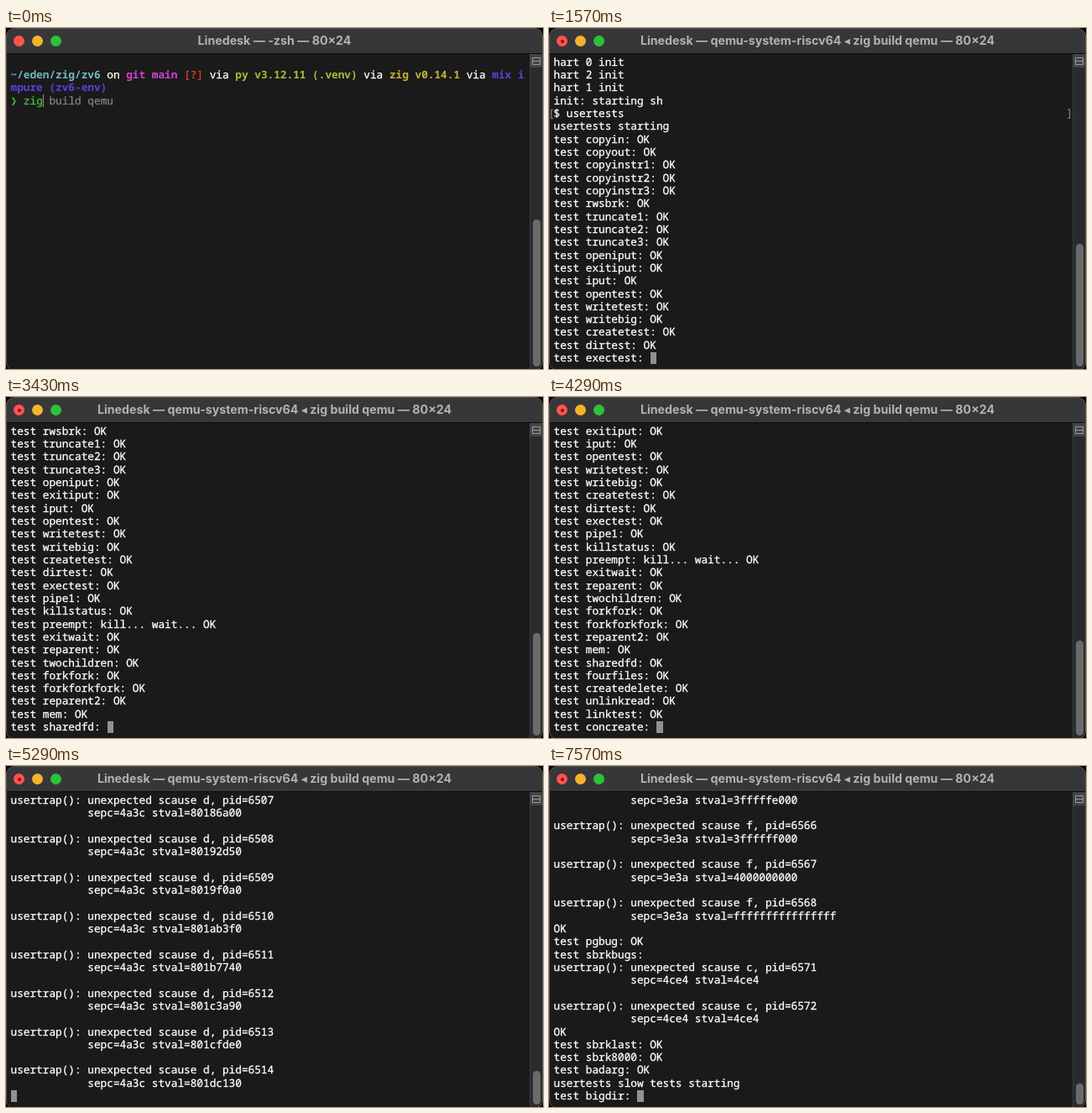
An HTML page for the animation above (8000 ms loop, 640 by 406 pixels).

```html
<!DOCTYPE html>
<html lang="en">
<head>
<meta charset="utf-8">
<title>Test run</title>
<style>
  html, body { margin: 0; width: 100%; height: 100%; overflow: hidden; background: #000; }
  #window { position: absolute; left: 0; top: 0; width: 640px; height: 408px; box-sizing: border-box;
    overflow: hidden; border-radius: 10px; background: #1a1a1a; }
  #window::after { content: ""; position: absolute; inset: 0; border: 1px solid #535354; border-radius: 10px; }
  #bar { position: absolute; left: 0; top: 0; width: 640px; height: 30px; background: #373638;
    border-bottom: 1px solid #0c0c0c; }
  #title { position: absolute; left: 0; top: 0; width: 640px; text-align: center; white-space: nowrap;
    font: 700 14.2px/30px Inter, "DejaVu Sans", sans-serif; color: #b3b1b2; }
  .light { position: absolute; top: 9px; width: 13px; height: 13px; border-radius: 50%; }
  #busy { position: absolute; left: 4.5px; top: 4.5px; width: 4px; height: 4px; border-radius: 50%; background: #7d120c; }
  #screen { position: absolute; left: 5.5px; top: 32.6px; color: #fff; white-space: pre;
    font: 500 12.75px/15.33px "Noto Sans Mono", "DejaVu Sans Mono", monospace; -webkit-text-stroke: .3px;
    font-variant-ligatures: none; text-rendering: geometricPrecision; }
  .row { position: relative; width: 612px; height: 15.33px; }
  .row b { font-weight: 700; -webkit-text-stroke: 0; }
  .marked::before, .marked::after { position: absolute; top: 0; color: #777; }
  .marked::before { content: "["; left: -6.5px; }
  .marked::after { content: "]"; left: 611px; }
  #cursor { position: absolute; height: 14.6px; background: #919191; }
  #track { position: absolute; left: 624px; top: 31px; width: 15px; height: 375px; background: #2b2b2d;
    border-left: 1px solid #3b3b3c; box-sizing: border-box; }
  #thumb { position: absolute; left: 628px; width: 9px; border-radius: 4.5px; background: #6b6b6b; }
</style>
</head>
<body>
<div id="window">
  <div id="bar">
    <div id="title"></div>
    <div class="light" style="left:9px;background:#fe544c"><div id="busy"></div></div>
    <div class="light" style="left:31px;background:#f5b32c"></div>
    <div class="light" style="left:53px;background:#2bc23c"></div>
  </div>
  <div id="screen"></div>
  <div id="cursor"></div>
  <div id="track"></div>
  <svg width="15" height="16" style="position:absolute;left:624px;top:31px" fill="none" stroke="#9a9a9a">
    <path d="M0 0h15v16H0z" fill="#444446" stroke="none"/>
    <path d="M3.5 4.5h9v8h-9zM3.5 8.5h9"/>
  </svg>
  <div id="thumb"></div>
</div>
<script>
const LOOP = 8000, ROWS = 24, COL = 7.65, LINE = 15.33, LEFT = 5.8, TOP = 33.3;
const get = id => document.getElementById(id);
const bold = (color, text) => `<b style="color:${color}">${text}</b>`;
const tinted = (color, text) => `<span style="color:${color}">${text}</span>`;

const blue = '#5b3ee0', green = '#45bd3f';
const prompt = '\n' + bold('#72b9c2', '~/eden/zig/zv6') + ' on ' + bold('#d440d2', 'git main') + ' ' +
  bold('#cc3a22', '[?]') + ' via ' + bold('#b0b83a', 'py v3.12.11 (.venv)') + ' via ' +
  bold('#c4b432', 'zig v0.14.1') + ' via ' + bold(blue, 'mix i') + '\n' + bold(blue, 'mpure (zv6-env)') +
  '\n' + bold(green, '❯') + ' ' + tinted(green, 'zig');

// Each finished test prints OK, then the next one announces itself.
const tests = names => names.split(' ').map(name => `OK\ntest ${name}: `).join('');
const trap = (cause, pid, sepc, stval) =>
  `\nusertrap(): unexpected scause ${cause}, pid=${pid}\n${' '.repeat(12)}sepc=${sepc} stval=${stval}\n`;
const traps = (cause, firstPid, sepc, addresses) =>
  addresses.map((address, i) => trap(cause, firstPid + i, sepc, address)).join('');

const kernelPages = Array.from({ length: 40 }, (_, i) => (0x80000000 + i * 50000).toString(16));
const highPowers = Array.from({ length: 26 }, (_, i) => (1n << BigInt(38 + i)).toString(16));
const readOnly = ['0', '80000000', '3fffffe000', '3ffffff000', '4000000000', 'f'.repeat(16)];

const output = [
  [140, ' build qemu\n'],
  [290, 'nmeta 46 (boot, super, log blocks 30 inode blocks 13, bitmap blocks 1) blocks 19\n54 total 2000\n' +
    'balloc: first 298 blocks have been allocated\nballoc: write bitmap block at sector 45\n'],
  [430, '{zv6} hello world\nhart 0 init\nhart 2 init\nhart 1 init\ninit: starting sh\n$ '],
  [570, 'usertests'],
  [710, '\nusertests starting\ntest copyin: '],
  [860, tests('copyout copyinstr1 copyinstr2 copyinstr3 rwsbrk')],
  [1000, tests('truncate1 truncate2 truncate3')],
  [1140, tests('openiput exitiput iput opentest writetest writebig')],
  [1430, tests('createtest')],
  [1570, tests('dirtest exectest')],
  [1710, tests('pipe1 killstatus')],
  [2570, tests('preempt') + 'kill... wait... ' + tests('exitwait reparent twochildren')],
  [2710, tests('forkfork')],
  [2860, tests('forkforkfork')],
  [3000, tests('reparent2')],
  [3290, tests('mem')],
  [3430, tests('sharedfd')],
  [3710, tests('fourfiles')],
  [4000, tests('createdelete')],
  [4140, tests('unlinkread linktest')],
  [4290, tests('concreate')],
  [4570, tests('linkunlink')],
  [4710, tests('subdir bigwrite')],
  [4860, tests('bigfile')],
  [5000, tests('fourteen rmdot dirfile iref forktest sbrkbasic')],
  [5140, tests('sbrkmuch')],
  [5290, tests('kernmem') + traps('d', 6475, '4a3c', kernelPages)],
  [5430, tests('MAXVAplus') + traps('f', 6516, '4ac8', highPowers) + tests('sbrkfail')],
  [5860, trap('d', 6553, '4c1a', '13000') + tests('sbrkarg validatetest bsstest bigargtest')],
  [6000, tests('argptest stacktest') + trap('d', 6561, '3dc2', '12b90') +
    tests('nowrite') + traps('f', 6563, '3e3a', readOnly) +
    tests('pgbug sbrkbugs') + trap('c', 6571, '4ce4', '4ce4') + trap('c', 6572, '4ce4', '4ce4') +
    tests('sbrklast sbrk8000 badarg') + 'OK\nusertests slow tests starting\ntest bigdir: '],
];

function place(element, box) {
  for (const side in box) element.style[side] = box[side] + 'px';
}

function render(step) {
  const typing = step === 0;
  const lines = (prompt + output.slice(0, step).map(([, text]) => text).join('')).split('\n');
  const shown = lines.slice(-ROWS);
  const column = shown.at(-1).replace(/<[^>]*>/g, '').length;
  const isMarked = line => !typing && /❯|^\$ u/.test(line);

  get('screen').innerHTML = shown.map((line, i) => {
    const hint = typing && i === shown.length - 1 ? tinted('#818181', ' build qemu') : '';
    return `<div class="row${isMarked(line) ? ' marked' : ''}">${line}${hint}</div>`;
  }).join('');
  get('title').textContent =
    `Linedesk — ${typing ? '-zsh' : 'qemu-system-riscv64 ◂ zig build qemu'} — 80×24`;
  get('busy').hidden = typing;
  place(get('cursor'), {
    left: LEFT + column * COL,
    top: TOP + (shown.length - 1) * LINE,
    width: typing ? 1 : COL,
  });

  // The scrollback already holds 22 earlier lines.
  const height = Math.max(24, 335.6 * ROWS / (22 + Math.max(ROWS, lines.length)));
  place(get('thumb'), { top: 403 - height, height });
}

let current = -1;
const start = performance.now();
function tick() {
  const time = (performance.now() - start) % LOOP;
  const step = output.filter(([at]) => at <= time).length;
  if (step !== current) render(current = step);
  requestAnimationFrame(tick);
}
tick();
</script>
</body>
</html>
```
